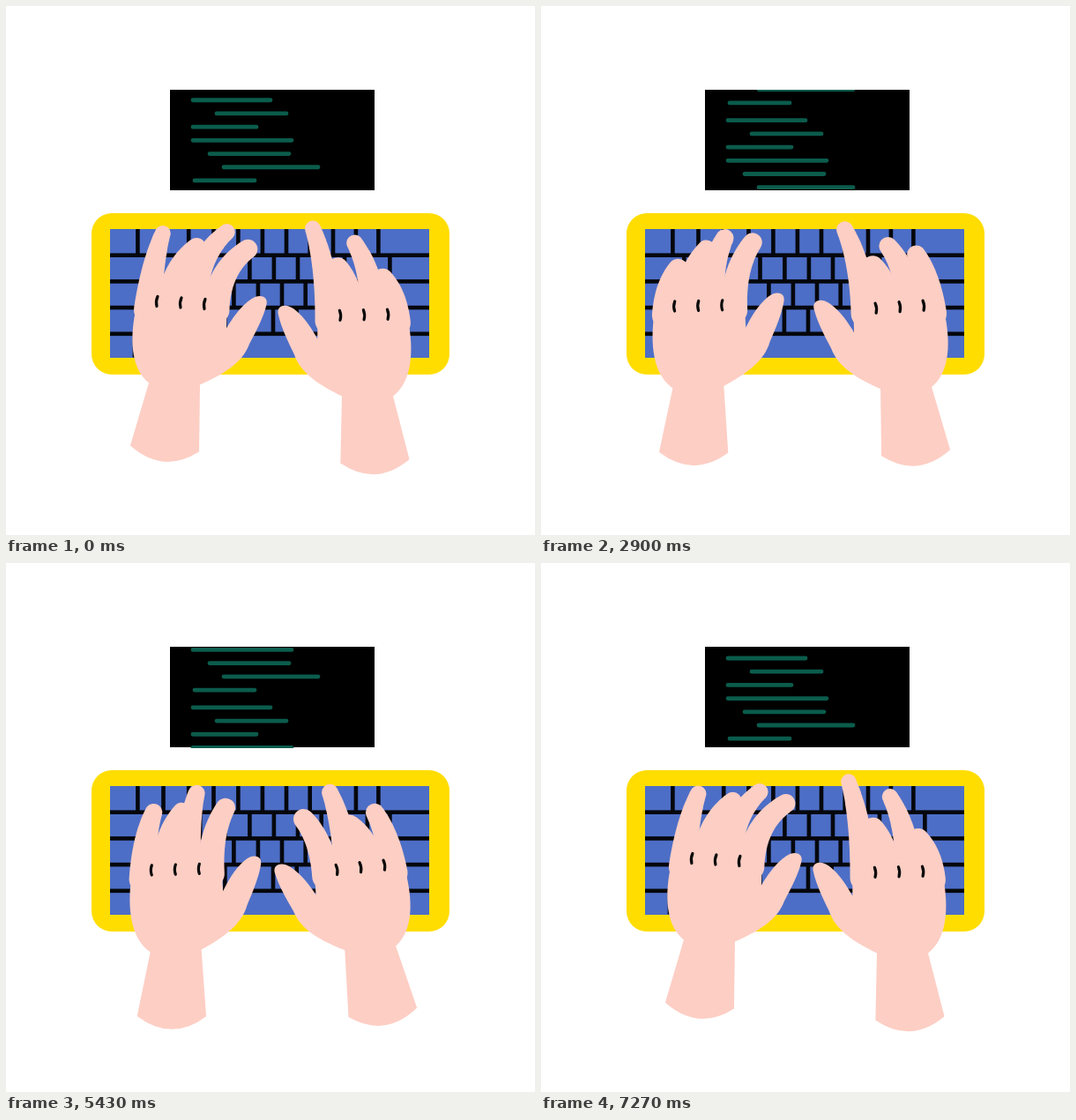
An HTML page with a canvas for the animation above (7.31 s loop, 600 by 600 pixels).

```html
<!DOCTYPE html>
<html lang="en">
<head>
<meta charset="utf-8">
<title>Typing hands</title>
<style>
html, body { margin: 0; width: 100%; height: 100%; overflow: hidden; background: #fff; }
canvas { display: block; width: 600px; height: 600px; }
</style>
</head>
<body>
<canvas id="stage" width="600" height="600"></canvas>
<script>
const ctx = document.getElementById('stage').getContext('2d');
const LOOP = 7310, CYCLE = LOOP / 2;
const SKIN = '#fdcec4', BLUE = '#4d6ec6', YELLOW = '#ffdd00', GREEN = '#0b5c4c';
const rad = deg => deg * Math.PI / 180;
const mix = (a, b, k) => a + (b - a) * k;

// Left and right end of each code line
const LINES = [[210, 302], [237, 320], [210, 286], [210, 326], [229, 323], [245, 356], [212, 284]];
const LINE_STEP = 15.2, LINE_SPAN = 111;

function drawScreen(t) {
  ctx.fillStyle = '#000';
  ctx.fillRect(186, 95, 232, 114);
  ctx.save();
  ctx.beginPath();
  ctx.rect(186, 95, 232, 115);
  ctx.clip();
  ctx.strokeStyle = GREEN;
  ctx.lineWidth = 4.8;
  ctx.lineCap = 'round';
  ctx.beginPath();
  LINES.forEach(([x1, x2], i) => {
    for (const shift of [0, LINE_SPAN]) {
      const y = 106.8 + i * LINE_STEP + shift - LINE_SPAN * t / CYCLE;
      ctx.moveTo(x1 + 2, y);
      ctx.lineTo(x2 - 2, y);
    }
  });
  ctx.stroke();
  ctx.restore();
}

function drawKeyboard() {
  ctx.fillStyle = YELLOW;
  ctx.beginPath();
  ctx.roundRect(97, 235, 406, 183, 23);
  ctx.fill();
  ctx.fillStyle = BLUE;
  ctx.fillRect(118, 253, 362, 146);
  ctx.fillStyle = '#05070c';
  const rowY = row => 253 + row * 29.7;
  const gap = (x, row) => ctx.fillRect(x - 2.3, rowY(row), 4.6, 29.7);
  for (let row = 1; row < 5; row++) ctx.fillRect(118, rowY(row) - 2.3, 362, 4.6);
  // Keys get slightly narrower towards the right
  [318, 331, 313, 303].forEach((middle, row) => {
    const [first, last] = row < 3 ? [-6 + (row === 2), 4] : [-2, 1];
    for (let k = first; k <= last; k++) gap(middle + 26.9 * k - 0.2 * k * k, row);
  });
  ctx.fillRect(143.7, rowY(4), 4.6, 26.7);
  ctx.fillRect(449.7, rowY(4), 4.6, 26.7);
}

// Key moments, shared by both hands; the last one joins the first
const TIMES = [0, 1015, 1200, 2200, 2515, CYCLE];

// Wrist keys are [x, y, turn]; curl rows run from little to index finger, 0 = straight
const HANDS = [
  {
    side: 1, lean: 16,
    wrist: [[191, 428.5, 0], [203, 441.5, -2.5], [205, 443, -3], [185, 438, -6], [174, 433.5, -6]],
    curl: [[0, 0.1, 0, 0.7, 0.85], [0.45, 0.75, 0.8, 0, 0.75], [0.1, 0.65, 0.7, 0.1, 0.2], [0.55, 0, 0.45, 0.4, 0.75]]
  },
  {
    side: -1, lean: 0,
    wrist: [[410, 442.5, -2], [407, 454.5, 4], [407, 453.5, 4], [417, 426.5, 1.5], [415.5, 430, 0.7]],
    curl: [[0.85, 0.95, 0.95, 0.3, 0.05], [0.1, 0.95, 0.95, 0.5, 0.7], [0.85, 0, 0.4, 0.2, 0.8], [0, 0.8, 0.9, 0.35, 0.45]]
  }
];
const LENGTH = [88, 90, 94, 106];
const ANGLE = [11, 16, 10, 12];

// Palm, thumb and forearm around the wrist
const PALM = new Path2D(
  'M-43 -88C-51 -53 -50 -18 -29 -1L-50 70Q-13 103 28 77L29 1' +
  'C54 -10 77 -23 85 -45C93 -60 101 -76 104 -88C108 -99 97 -103 87 -96' +
  'C74 -87 65 -73 59 -63L60 -103L-41 -106Z');

// A tapered finger: discs along a curve from the knuckle, bending towards the tip
function drawFinger(i, curl, lean) {
  const x = -30 + 25.5 * i, y = -92 + 3.5 * (i - 1.5) ** 2;
  const length = LENGTH[i] * (1 - 0.48 * curl);
  const tilt = rad(ANGLE[i] + 10 * curl + lean * (1 - curl) * i / 2);
  const root = rad(5);
  const tipR = 9 + 3.5 * curl;
  ctx.beginPath();
  for (let k = 0; k <= 1; k += 1 / 64) {
    const bend = 1.2 * k * (1 - k) * length, reach = k * k * length;
    const px = x + bend * Math.sin(root) + reach * Math.sin(tilt);
    const py = y - bend * Math.cos(root) - reach * Math.cos(tilt);
    const r = mix(16, tipR, k);
    ctx.moveTo(px + r, py);
    ctx.arc(px, py, r, 0, 2 * Math.PI);
  }
  ctx.fill();
}

function drawKnuckles() {
  ctx.strokeStyle = '#0a0a0a';
  ctx.lineWidth = 3.2;
  ctx.lineCap = 'round';
  ctx.beginPath();
  for (let i = 0; i < 3; i++) {
    const x = -20 + 27 * i, y = -93.5 + 1.5 * i;
    ctx.moveTo(x + 1, y - 5.5);
    ctx.quadraticCurveTo(x - 1.5, y, x, y + 5.5);
  }
  ctx.stroke();
}

function drawHand({ side, lean, wrist, curl }, t) {
  const from = TIMES.findIndex((start, i) => t >= start && t < TIMES[i + 1]);
  const to = (from + 1) % wrist.length;
  const span = TIMES[from + 1] - TIMES[from];
  const u = (t - TIMES[from]) / span;
  const ease = (1 - Math.cos(Math.PI * u)) / 2;
  const [x, y, turn] = wrist[from].map((v, i) => mix(v, wrist[to][i], ease));
  // Neighbouring fingers tap in turn, about twice a second
  const tap = 0.2 * Math.sin(2 * Math.PI * Math.floor(span / 500) * u);
  const leanNow = lean * Math.max(0, Math.cos(2 * Math.PI * t / CYCLE));

  ctx.save();
  ctx.translate(x, y);
  ctx.scale(side, 1);
  ctx.rotate(rad(turn));
  ctx.fillStyle = SKIN;
  curl.forEach((keys, i) => {
    drawFinger(i, mix(keys[from], keys[to], ease) + (i % 2 ? tap : -tap), leanNow);
  });
  ctx.fill(PALM);
  drawKnuckles();
  ctx.restore();
}

function draw(t) {
  ctx.fillStyle = '#fff';
  ctx.fillRect(0, 0, 600, 600);
  drawScreen(t);
  drawKeyboard();
  for (const hand of HANDS) drawHand(hand, t);
}

const start = performance.now();
function tick() {
  draw((performance.now() - start) % CYCLE);
  requestAnimationFrame(tick);
}
tick();
</script>
</body>
</html>
```
